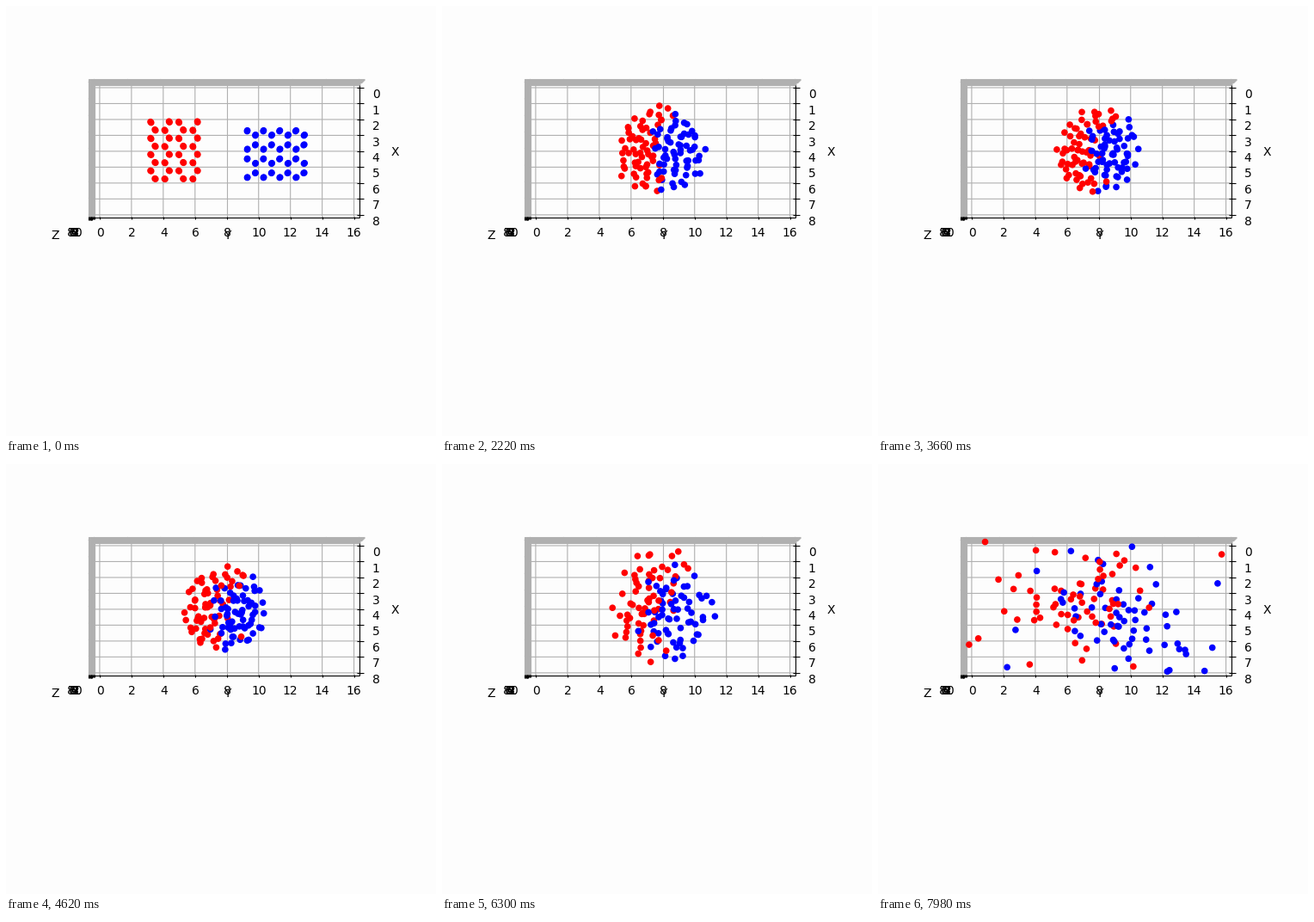
Write a matplotlib script that moves like this. It is 500x500 px and loops after 8000 ms.

```python
import numpy as np
import matplotlib.pyplot as plt
from matplotlib.animation import FuncAnimation
from matplotlib.collections import LineCollection

STEPS = 134        # simulated pictures per loop
SUB = 12           # integration steps per picture
DT = 0.1 / SUB
SIGMA2 = 0.855 ** 2
BOX = np.array([8.0, 16.0, 8.0])
LOW, HIGH = -BOX / 48, BOX * 49 / 48
MIDDLE = np.array([4.1, 7.9, 4.0])
EYE = np.array([256.76, 245.9])    # vanishing point in pixels
GREY = "#b0b0b0"


def hcp(n=4):
    """Hexagonal close packing of n*n*n atoms with spacing 1."""
    k, j, i = np.indices((n, n, n)).reshape(3, -1)
    x = i + 0.5 * ((j + k) % 2)
    y = np.sqrt(3) / 2 * (j + (k % 2) / 3)
    return np.column_stack([x, y, np.sqrt(6) / 3 * k])


def forces(pos, shell):
    """Lennard-Jones forces, plus a soft shell that keeps the drop together."""
    d = pos[:, None, :] - pos[None, :, :]
    r2 = np.einsum("ijk,ijk->ij", d, d)
    np.fill_diagonal(r2, 1e9)
    r2 = np.maximum(r2, 0.42)
    s6 = (SIGMA2 / r2) ** 3
    f = np.einsum("ij,ijk->ik", 24 * s6 * (2 * s6 - 1) / r2, d)
    if shell:
        out = pos - MIDDLE
        r = np.linalg.norm(out, axis=1, keepdims=True)
        f -= 10 * out / r * np.maximum(r - 2.4, 0)
    return f


def target(step):
    """Thermostat: off during the impact, then warm, then hot."""
    if step < 20:
        return None
    return 0.5 + 0.9 * np.clip((step - 96) / 3, 0, 1)


def simulate():
    rng = np.random.default_rng(4)
    red = hcp() + [2.29, 3.31, 2.78]
    blue = hcp()[:, [1, 0, 2]] + [2.82, 9.26, 2.78]
    pos = np.vstack([red, blue])
    vel = rng.normal(0, 0.05, pos.shape)
    vel[:64, 1] += 1.03
    vel[64:, 1] -= 1.03
    vel -= vel.mean(axis=0)
    track = [pos.copy()]
    acc = forces(pos, False)
    for step in range(1, STEPS):
        goal = target(step)
        shell = 22 <= step < 97
        tau = 0.3 if step > 95 else 0.8
        for _ in range(SUB):
            vel += 0.5 * DT * acc
            pos += DT * vel
            vel = np.where(pos < 0, np.abs(vel), vel)
            vel = np.where(pos > BOX, -np.abs(vel), vel)
            pos = np.clip(pos, 0, BOX)
            acc = forces(pos, shell)
            vel += 0.5 * DT * acc
            if goal is not None:
                temp = np.mean(vel ** 2)
                vel *= np.sqrt(1 + DT / tau * (goal / temp - 1))
        track.append(pos.copy())
    return track


def project(pos):
    """Perspective view from above the edge where x is largest."""
    x, y, z = np.asarray(pos, float).T
    scale = 193.05 / (10.446 - 0.446 * (z - LOW[2]) / (HIGH[2] - LOW[2]))
    return EYE + np.column_stack([y - 8, x - HIGH[0]]) * scale[:, None]


def draw_lines(lines, color, z):
    ax.add_collection(LineCollection([project(p) for p in lines],
                                     colors=color, linewidths=0.8, zorder=z))


def label(point, text, va="top", shift=(0.2, 0.9)):
    x, y = project([point])[0] + shift
    ax.text(x, y, text, size=10, ha="center", va=va, zorder=4)


fig = plt.figure(figsize=(5, 5), dpi=100, facecolor="#fdfdfd")
ax = fig.add_axes([0, 0, 1, 1])
ax.set(xlim=(0, 500), ylim=(500, 0))
ax.axis("off")

x0, y0, z0 = LOW
x1, y1, z1 = HIGH
ticks = np.arange(9)

# Grid lines run down one wall and across the floor, or round both walls
draw_lines([[(x, y0, z1), (x, y0, z0), (x, y1, z0)] for x in ticks], GREY, 1)
draw_lines([[(x0, y, z1), (x0, y, z0), (x1, y, z0)] for y in 2 * ticks], GREY, 1)
draw_lines([[(x0, y1, z), (x0, y0, z), (x1, y0, z)] for z in ticks], GREY, 2)

# Axis lines and ticks
draw_lines([[(x1, y0, z0), (x1, y1, z0)], [(x0, y1, z0), (x1, y1, z0)],
            [(x1, y0, z0), (x1, y0, z1)]], "k", 3)
draw_lines([[(x, y1 - 0.139, z0), (x, y1 + 0.278, z0)] for x in ticks], "k", 3)
draw_lines([[(x1 - 0.069, y, z0), (x1 + 0.139, y, z0)] for y in 2 * ticks], "k", 3)
draw_lines([[(x1 - 0.069, y0, z), (x1 + 0.139, y0, z)] for z in ticks], "k", 3)

dx, dy = 0.532, 1.065    # distance of the tick labels from the box
for n in ticks:
    label((n, y1 + dy, z0 - dx), str(n))
    label((x1 + dx, 2 * n, z0 - dx), str(2 * n))
    label((x1 + dx, y0 - dy, n), str(n))
ax.text(452.5, 169.5, "X", size=10, ha="center", va="center")
ax.text(257, 267, "Y", size=10, ha="center", va="center")
ax.text(57.5, 267, "Z", size=10, ha="center", va="center")

TRACK = simulate()
COLORS = np.array([[1.0, 0, 0, 1]] * 64 + [[0, 0, 1.0, 1]] * 64)
dots = ax.scatter(np.zeros(128), np.zeros(128), s=20, c=COLORS,
                  linewidths=1, zorder=5)


def update(tick):
    pos = TRACK[tick // 3]
    order = np.argsort(pos[:, 2])
    dots.set_offsets(project(pos[order]))
    dots.set_facecolor(COLORS[order])
    dots.set_edgecolor(COLORS[order])
    return dots,


anim = FuncAnimation(fig, update, frames=400, interval=20,
                     init_func=lambda: update(0), repeat=True, repeat_delay=0)
plt.show()
```
